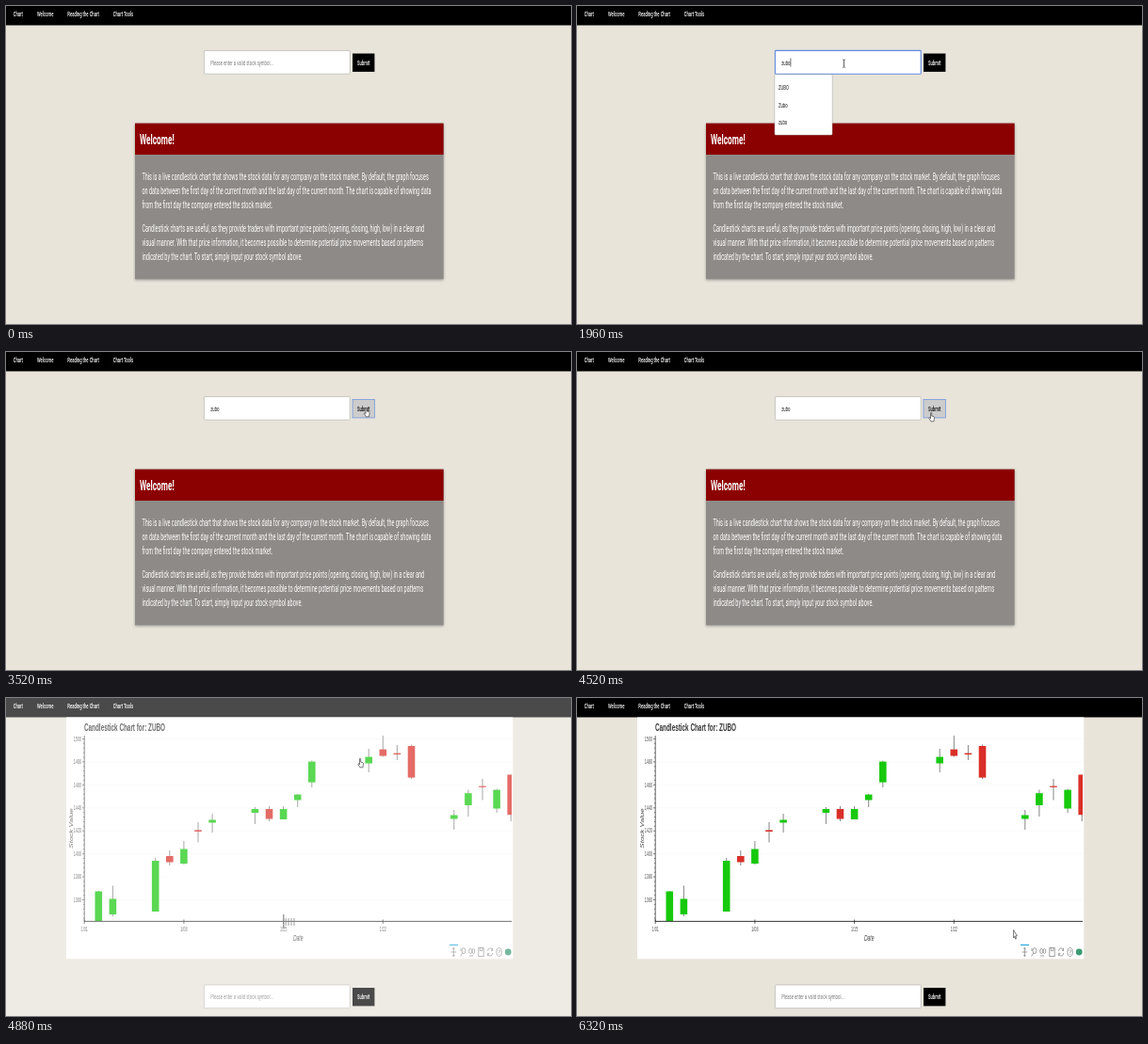
An HTML page that plays this animation: 600 by 338 pixels, repeating every 6360 ms.

```html
<!DOCTYPE html>
<html lang="en">
<head>
<meta charset="utf-8">
<title>Candlestick chart</title>
<style>
  html, body { margin: 0; width: 100%; height: 100%; overflow: hidden; background: #fff; }
  svg { display: block; width: 600px; height: 338px; }
  text { font-family: Roboto, Arial, sans-serif; white-space: pre; }
  .plot text { font-family: "Liberation Sans", Arial, sans-serif; }
  .card { filter: drop-shadow(0 1.2px 1.5px rgba(0, 0, 0, .32)); }
  .drop { filter: drop-shadow(0 .6px .7px rgba(0, 0, 0, .35)); }
  .icons { fill: none; stroke: #8a8a8a; stroke-width: .8; }
  .hide { display: none; }
</style>
</head>
<body>
<svg id="stage" viewBox="0 0 600 338" xmlns="http://www.w3.org/2000/svg"></svg>
<script>
const LOOP = 6360;
const SQUEEZE = 0.5525;   // the whole page is narrowed by this factor
const SYMBOL = 'zubo';
const HINT = 'Please enter a valid stock symbol...';
const HISTORY = ['ZUBO', 'Zubo', 'zubo', 'KELN', 'kevd', 'Mopt'];
const ROW = 18.5;

const rect = (x, y, w, h, fill, more = '') =>
  `<rect x="${x}" y="${y}" width="${w}" height="${h}" fill="${fill}" ${more}/>`;
const line = (x1, y1, x2, y2, color = '#222', width = 0.7) =>
  `<path d="M${x1} ${y1}L${x2} ${y2}" stroke="${color}" stroke-width="${width}"/>`;
const label = (x, y, size, str, fill = '#fff', more = '') =>
  `<text transform="translate(${x} ${y}) scale(${SQUEEZE} 1)" font-size="${size}" fill="${fill}" ${more}>${str}</text>`;

function nav() {
  const items = [[7.7, 'Chart'], [33, 'Welcome'], [65.3, 'Reading the Chart'], [113.8, 'Chart Tools']];
  return rect(0, 0, 600, 20.5, '#000') +
    items.map(([x, s]) => label(x, 11.4, 7.6, s, '#fff', 'font-weight="500"')).join('');
}

function form(y, id) {
  return rect(210.4, y + 0.4, 154.8, 24.8, '#fff', `id="${id}Box" stroke="#bdbbb6" stroke-width=".8" rx=".6"`) +
    label(217.2, y + 15.5, 7.75, HINT, '#7b7b7b', `id="${id}Text"`) +
    rect(368, y + 3.5, 23.4, 19.4, '#000', `id="${id}Btn"`) +
    label(372.9, y + 15.5, 7.75, 'Submit', '#fff', `id="${id}Label" font-weight="500"`);
}

function card() {
  const lines = [
    'This is a live candlestick chart that shows the stock data for any company on the stock market. By default, the graph focuses',
    'on data between the first day of the current month and the last day of the current month. The chart is capable of showing data',
    'from the first day the company entered the stock market.',
    'Candlestick charts are useful, as they provide traders with important price points (opening, closing, high, low) in a clear and',
    'visual manner. With that price information, it becomes possible to determine potential price movements based on patterns',
    'indicated by the chart. To start, simply input your stock symbol above.'
  ];
  return `<g class="card">${rect(137, 124.7, 327.6, 165.6, '#8e8a87')}</g>` +
    rect(137, 124.7, 327.6, 33.3, '#8b0000') +
    label(142, 147.3, 15, 'Welcome!', '#fff', 'font-weight="700"') +
    lines.map((s, i) => label(144.4, 185.3 + 15 * i + (i > 2 ? 10 : 0), 10, s)).join('');
}

// day, open, close, high, low (vertical positions)
const CANDLES = [
  [2, 237, 205.5, 205, 237], [3, 230, 213.5, 199.5, 232], [6, 227, 173, 170, 227],
  [7, 168, 174.5, 162, 178], [8, 176, 160.5, 152, 177], [9, 140.4, 142, 132, 153.5],
  [10, 132.5, 129.5, 123, 143], [13, 122, 118, 116, 134], [14, 118, 128.5, 115, 131],
  [15, 129, 118, 115, 129], [16, 108.5, 102.6, 102, 116], [17, 89.6, 67.6, 66.5, 95],
  [21, 69.5, 62.6, 54, 79], [22, 54.6, 61.5, 40, 62.5], [23, 58.6, 60.1, 50, 66],
  [24, 51, 84.6, 49.5, 86], [27, 128.5, 124.5, 119, 140], [28, 114, 101.2, 97.5, 126],
  [29, 93.6, 94.8, 86, 108.5], [30, 117.5, 97.6, 96.5, 122], [31, 81.5, 124.2, 81.5, 131]
];
const dayX = d => 83.2 + 15.1 * (d - 1);

function plot() {
  let s = rect(64, 20.5, 474.3, 256.8, '#fff');
  s += label(83, 35, 11.5, 'Candlestick Chart for: ' + HISTORY[0], '#333', 'font-weight="700"');
  for (let i = 0; i < 8; i++) s += line(83, 43.5 + 24.43 * i, 537, 43.5 + 24.43 * i, '#f5f5f5', 0.5);
  s += '<g clip-path="url(#area)">';
  for (const [d, open, close, high, low] of CANDLES) {
    const x = dayX(d);
    s += line(x, high, x, low, '#333', 0.6);
    s += rect(x - 3.8, Math.min(open, close), 7.6, Math.abs(open - close), close < open ? '#17c90c' : '#d92f28');
  }
  s += '</g>' + line(83.2, 40, 83.2, 237.4) + line(83, 237.4, 537, 237.4, '#222', 0.9);
  for (let i = 0; i < 40; i++) {
    const y = 43.5 + 4.886 * i;
    if (y > 237) break;
    s += line(i % 5 ? 82 : 80.9, y, 83.2, y, '#333', 0.6);
    if (i % 5 === 0) s += label(80.1, y + 2.2, 6.8, 1500 - 4 * i, '#555', 'text-anchor="end"');
  }
  ['1/01', '1/08', '1/15', '1/22'].forEach((t, i) => {
    const x = dayX(1 + 7 * i);
    s += line(x, 235.5, x, 240) + label(x, 247.8, 6.8, t, '#555', 'text-anchor="middle"');
  });
  s += label(310.2, 258, 9, 'Date', '#444', 'font-style="italic" text-anchor="middle"');
  s += `<text transform="translate(70.6 138.5) scale(${SQUEEZE} 1) rotate(-90)" font-size="8" fill="#444" font-style="italic" text-anchor="middle">Stock Value</text>`;
  return `<g class="plot">${s}</g>`;
}

function tools() {
  return line(471, 262.5, 480, 262.5, '#26aae1', 1.2) + `<g class="icons">
    <path d="M475.4 265.6v9M472.6 270h5.6M474.4 267l1-1.6 1 1.6M474.4 273.2l1 1.6 1-1.6"/>
    <ellipse cx="486" cy="268.6" rx="1.9" ry="3"/><path d="M484.8 271l-2.2 3.6M483 266v3"/>
    <ellipse cx="493.3" cy="269" rx="1.6" ry="2.7"/><ellipse cx="496.4" cy="269" rx="1.4" ry="2.5"/><path d="M492 274h4"/>
    <rect x="501.8" y="265.6" width="5.4" height="9"/><path d="M503.3 265.6v3h2.6v-3"/>
    <path d="M511.5 269q.6-3.4 2.6-3.2 1.8 0 2.4 2.6M516.7 271q-.6 3.4-2.6 3.2-1.8 0-2.4-2.6M516.6 265.8v2.8h-1.6M511.6 274.2v-2.8h1.6"/>
    <ellipse cx="523.6" cy="270" rx="2.7" ry="4.5"/><path d="M522.6 268.6q1-2 2 0 0 1-1 1.8v.8M523.6 272.2v.8"/>
  </g><circle cx="533.2" cy="270" r="3.4" fill="#3b9c74"/>`;
}

const staleTicks = [294.8, 297.2, 300, 303, 306]
  .map((x, i) => line(x, i ? 234 : 230, x, i ? 242 : 245, '#555', i ? 0.8 : 1.2)).join('');

const drop = `<g id="drop">
  <rect id="dropBox" class="drop" x="210" y="73" width="61" height="64" rx="1" fill="#fff" stroke="#c8c8c8" stroke-width=".5"/>
  ${HISTORY.map((s, i) => label(213.9, 89.4 + ROW * i, 7.8, s, '#222', 'class="row"')).join('')}</g>`;

const cursors = `<g id="cursor">
  <path id="arrow" d="M0 0V8.4L1.2 6.9L2 9.6L2.9 9L2.1 6.3H3.8Z" fill="#fff" stroke="#222" stroke-width=".6"/>
  <path id="beam" d="M-1.3-4H-.4L0-3.4L.4-4H1.3M0-3.4V3.6M-1.3 4.2H-.4L0 3.6L.4 4.2H1.3" fill="none" stroke="#222" stroke-width=".7"/>
  <path id="hand" d="M0 .6Q.6-.6 1.2 .6V4L3.6 4.8Q4.2 5 4 6.4L3.4 9.8H.4L-1.6 6.4Q-1.4 5.2-.6 5.8L0 6.6Z" fill="#fff" stroke="#222" stroke-width=".6"/>
</g>`;

const back = rect(0, 0, 600, 338, '#e8e4da');
document.getElementById('stage').innerHTML =
  `<defs><clipPath id="area"><rect x="83" y="39" width="454" height="198.4"/></clipPath></defs>
  ${rect(0, 0, 600, 338, '#fff')}
  <g id="home">${back}${nav()}${card()}${form(47, 'top')}
    ${rect(0, 55.5, 0.6, 9, '#111', 'id="caret"')}${drop}</g>
  <g id="result">${back}${nav()}${plot()}${tools()}<g id="stale">${staleTicks}</g>${form(304.5, 'low')}</g>
  ${cursors}`;

const el = id => document.getElementById(id);
const show = (node, on) => node.classList.toggle('hide', !on);
const between = (t, a, b) => t >= a && t < b;
const ease = p => p * p * (3 - 2 * p);

// time, x, y
const PATH = [
  [80, 288, 98], [360, 283.5, 61], [2680, 283.5, 61], [3280, 366, 62], [3480, 382, 59],
  [3960, 382, 59], [4520, 375.5, 64], [4960, 375.5, 64], [5360, 301, 130],
  [5520, 291, 151.3], [5800, 291, 151.3], [6320, 463.6, 246.6]
];
function pointer(t) {
  const i = PATH.findIndex(k => k[0] > t);
  if (i < 1) return PATH[i < 0 ? PATH.length - 1 : 0].slice(1);
  const [t0, x0, y0] = PATH[i - 1], [t1, x1, y1] = PATH[i];
  const p = ease((t - t0) / (t1 - t0));
  return [x0 + (x1 - x0) * p, y0 + (y1 - y0) * p];
}

const KEYS = [1400, 1640, 1880, 1960];
const FOCUS = 560, OPEN = 840, CLICK = 3400, SWITCH = 4745, FADE = 400;
const rows = document.querySelectorAll('.row');

function draw(t) {
  const home = t < SWITCH;
  show(el('home'), home);
  show(el('result'), !home);

  if (home) {
    const typed = SYMBOL.slice(0, KEYS.filter(k => t >= k).length);
    const focused = between(t, FOCUS, CLICK);
    const field = el('topText');
    field.textContent = typed || HINT;
    field.setAttribute('fill', typed ? '#222' : '#7b7b7b');
    el('topBox').setAttribute('stroke', focused ? '#5f8ae0' : '#bdbbb6');
    el('topBox').setAttribute('stroke-width', focused ? 1.1 : 0.8);

    const lastKey = KEYS.filter(k => t >= k).pop() || FOCUS;
    show(el('caret'), focused && (t - lastKey) % 1120 < 560);
    el('caret').setAttribute('x', 217.3 + (typed ? field.getComputedTextLength() * SQUEEZE : 0));

    const count = typed ? 3 : HISTORY.length;
    show(el('drop'), between(t, OPEN, CLICK));
    el('dropBox').setAttribute('height', 8.5 + ROW * count);
    rows.forEach((r, i) => show(r, i < count));

    const hover = t >= 3320;
    const btn = el('topBtn');
    btn.setAttribute('fill', hover ? '#ccc' : '#000');
    btn.setAttribute('stroke', t >= CLICK ? '#7f9fe0' : 'none');
    btn.setAttribute('stroke-width', 0.9);
    el('topLabel').setAttribute('fill', hover ? '#111' : '#fff');
  } else {
    const p = Math.min(1, (t - SWITCH) / FADE);
    el('result').setAttribute('opacity', 1 - Math.pow(1 - p, 2.95));
    show(el('stale'), t < 5000);
  }

  const [x, y] = pointer(t);
  const overField = between(t, 80, CLICK) && between(x, 210, 365) && y < 72;
  const overButton = between(t, 3320, 4980);
  el('cursor').setAttribute('transform', `translate(${x} ${y})`);
  show(el('cursor'), t >= 80);
  show(el('beam'), overField);
  show(el('hand'), overButton);
  show(el('arrow'), !overField && !overButton);
}

const start = performance.now();
function tick() {
  draw((performance.now() - start) % LOOP);
  requestAnimationFrame(tick);
}
tick();
</script>
</body>
</html>
```
